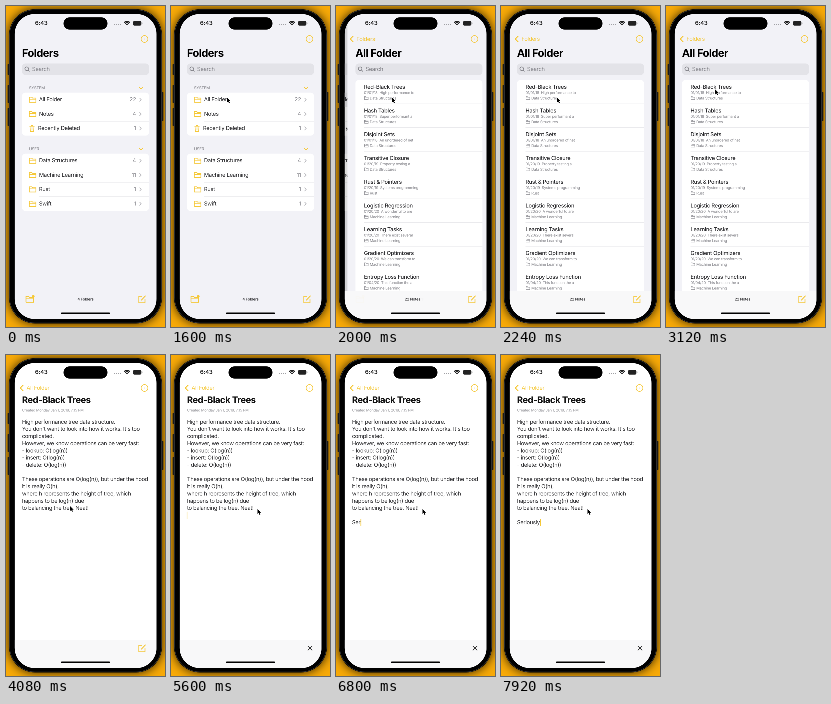
An HTML page with a canvas that plays this animation: 159x321 px, repeating every 8 s.

```html
<!DOCTYPE html>
<html lang="en">
<head>
<meta charset="utf-8">
<title>Notes app</title>
<style>
html, body { margin: 0; width: 100%; height: 100%; overflow: hidden; background: #f8aa08; }
canvas { display: block; width: 159px; height: 321px; }
</style>
</head>
<body>
<canvas id="stage"></canvas>
<script>
const LOOP = 8000, W = 159, H = 321;
const SCALE = 4; // oversampled, so small text stays soft and evenly spaced
const canvas = document.getElementById('stage');
const c = canvas.getContext('2d');
canvas.width = W * SCALE;
canvas.height = H * SCALE;
c.textRendering = 'geometricPrecision';

const YELLOW = '#f5c838', INK = '#2c2c2f', GREY = '#85858b', LINE = '#e4e4e8', PAPER = '#f2f2f7';
const SCREEN = { x: 8.7, y: 8, w: 141.8, h: 305 };

const FOLDER_GROUPS = [
  ['SYSTEM', 82, [['All Folder', 22], ['Notes', 4], ['Recently Deleted', 1]]],
  ['USER', 143, [['Data Structures', 4], ['Machine Learning', 11], ['Rust', 1], ['Swift', 1]]]
];
const DS = 'Data Structures', ML = 'Machine Learning';
const NOTES = [
  ['Red-Black Trees', '01/01/18  High performance to', DS],
  ['Hash Tables', '01/01/18  Super performant a', DS],
  ['Disjoint Sets', '01/01/18  An unordered of net', DS],
  ['Transitive Closure', '01/20/19  Property testing a', DS],
  ['Rust & Pointers', '01/20/19  Systems programming', 'Rust'],
  ['Logistic Regression', '01/20/20  A wonderful to are', ML],
  ['Learning Tasks', '01/20/20  There exist several', ML],
  ['Gradient Optimizers', '01/20/20  We can transform to', ML],
  ['Entropy Loss Function', '01/04/20  This function the a', ML]
];
const BODY = `High performance tree data structure.
You don't want to look into how it works. It's too
complicated.
However, we know operations can be very fast:
- lookup: O(log(n))
- insert: O(log(n))
- delete: O(log(n))

These operations are O(log(n)), but under the hood
it is really O(h),
where h represents the height of tree, which
happens to be log(n) due
to balancing the tree. Neat!`.split('\n');
const TYPED = 'Seriously';

// Cursor keys: time, x, y
const CURSOR = [[500, 164, 190], [1400, 56, 91.5], [2400, 56, 91.5], [3100, 49, 83.2],
  [3740, 49, 83.2], [4060, 64, 151], [4300, 64, 151], [4800, 86.5, 154]];
const OPEN_LIST = 1660, OPEN_NOTE = 3588, EDIT = 5000, ENTER = 6200, TYPE = 6500, KEY = 150;

const clamp = v => Math.min(1, Math.max(0, v));
const mix = (a, b, p) => a + (b - a) * p;
const smooth = p => p * p * (3 - 2 * p);
const push = (t, start) => 1 - (1 - clamp((t - start) / 480)) ** 3;

function text(s, x, y, size = 5.5, color = INK, weight = 400, align = 'left') {
  c.font = `${weight} ${size}px Inter, sans-serif`;
  c.letterSpacing = `${-0.025 * size}px`;
  c.textBaseline = 'middle';
  c.textAlign = align;
  c.fillStyle = color;
  c.fillText(s, x, y);
}
function box(x, y, w, h, r, color) {
  c.beginPath();
  c.roundRect(x, y, w, h, r);
  c.fillStyle = color;
  c.fill();
}
function line(color, width, ...pts) {
  c.beginPath();
  pts.forEach(([x, y]) => c.lineTo(x, y));
  c.strokeStyle = color;
  c.lineWidth = width;
  c.stroke();
}
function arc(x, y, r, color, width, from = 0, to = 7) {
  c.beginPath();
  c.arc(x, y, r, from, to);
  c.strokeStyle = color;
  c.lineWidth = width;
  c.stroke();
}
function layer(alpha, dx, draw) {
  c.save();
  c.globalAlpha *= alpha;
  c.translate(dx, 0);
  draw();
  c.restore();
}

function folder(x, y, w, h, color, width) {
  line(color, width, [x, y + h], [x, y], [x + w * .35, y], [x + w * .5, y + h * .18],
    [x + w, y + h * .18], [x + w, y + h], [x, y + h]);
  line(color, width, [x, y + h * .4], [x + w, y + h * .4]);
}
function trash(x, y) {
  line(YELLOW, .7, [x - 2.5, y - 2.2], [x + 2.5, y - 2.2]);
  line(YELLOW, .7, [x - 1, y - 3], [x + 1, y - 3]);
  line(YELLOW, .7, [x - 2, y - 2], [x - 1.6, y + 3], [x + 1.6, y + 3], [x + 2, y - 2]);
  line(YELLOW, .7, [x, y - 1], [x, y + 2]);
}
function compose(x, y) {
  line(YELLOW, .8, [x, y - 3], [x - 3.2, y - 3], [x - 3.2, y + 3.5], [x + 3, y + 3.5], [x + 3, y]);
  line(YELLOW, .9, [x - .8, y + 1], [x + 3.6, y - 3.6]);
}
function more() {
  arc(138.5, 33, 3.4, YELLOW, .7);
  for (const d of [-1.6, 0, 1.6]) box(138.1 + d, 32.6, .8, .8, .4, YELLOW);
}
function search() {
  box(16, 57.5, 127, 11.5, 3.5, '#e3e3e8');
  arc(20.7, 62.7, 1.8, GREY, .7);
  line(GREY, .7, [22, 64], [23.5, 65.5]);
  text('Search', 26, 63.4, 5.6, GREY);
}

function foldersPage(t) {
  box(8, 8, 143, 306, 0, PAPER);
  search();
  for (const [name, y, rows] of FOLDER_GROUPS) {
    text(name, 23, y, 4, GREY);
    line(YELLOW, .8, [133, y - 1], [135, y + 1], [137, y - 1]);
    const top = y + 4.6;
    box(16, top, 127, rows.length * 14.35, 3.5, '#fff');
    rows.forEach(([label, count], i) => {
      const ry = top + 7.1 + i * 14.35;
      if (label === 'All Folder' && t > OPEN_LIST)
        box(16, top, 127, 14.35, [3.5, 3.5, 0, 0], '#e6e6ea');
      const bin = label === 'Recently Deleted';
      if (bin) trash(26, ry);
      else folder(23.3, ry - 2.6, 6.6, 5.2, YELLOW, .75);
      text(label, bin ? 32 : 33, ry);
      text(count, 130, ry, 5.5, GREY, 400, 'right');
      line('#b9b9be', .7, [133.5, ry - 1.8], [135.2, ry], [133.5, ry + 1.8]);
      if (i) line(LINE, .4, [33, ry - 7.1], [143, ry - 7.1]);
    });
  }
}
function listPage() {
  box(8, 8, 143, 306, 0, PAPER);
  search();
  box(16, 74, 127, 240, [3.5, 3.5, 0, 0], '#fff');
  NOTES.forEach(([title, meta, group], i) => {
    const y = 81 + i * 23.75;
    text(title, 24.5, y, 5.5, INK, 500);
    text(meta, 24.5, y + 5.9, 3.75, GREY);
    folder(25, y + 9.6, 3.8, 3, GREY, .4);
    text(group, 30.3, y + 11.3, 3.8, GREY);
    line(LINE, .4, [24.5, y + 16.8], [143, y + 16.8]);
  });
}
function notePage(t) {
  box(8, 8, 143, 306, 0, '#fff');
  text('Red-Black Trees', 16, 45.2, 9, '#111', 700);
  text('Created Monday Jan 1, 2018, 7:15 PM', 16, 55.5, 3.7, '#9a9a9f');
  const row = i => 67 + i * 7.18;
  BODY.forEach((s, i) => text(s, 16, row(i)));
  const typed = TYPED.slice(0, Math.max(0, Math.floor((t - TYPE) / KEY) + 1));
  text(typed, 16, row(14));
  if (t > EDIT) {
    const x = 15.7 + (typed ? c.measureText(typed).width + .4 : 0);
    const phase = (t - EDIT) % 1000;
    const alpha = t > ENTER ? 1 : 1 - clamp((phase - 500) / 160) + clamp((phase - 840) / 160);
    layer(alpha, 0, () => box(x, row(t > ENTER ? 14 : 13) - 3.7, .8, 7.4, .3, YELLOW));
  }
}

const PAGES = [
  { title: 'Folders', draw: foldersPage },
  { title: 'All Folder', draw: listPage },
  { draw: notePage }
];

// Page `to` slides over page `from`, whose large title shrinks into the back label.
function navigate(from, to, back, p, t) {
  if (p < 1) {
    layer(1, -42 * p, () => from.draw(t));
    box(8, 8, 143, 306, 0, `rgba(0,0,0,${.14 * p})`);
  }
  if (p > 0) layer(1, 141 * (1 - p), () => {
    to.draw(t);
    if (to.title) text(to.title, 16, 47.5, 10.6, '#000', 700);
  });
  if (back) layer(1 - p, -42 * p, () => text(back.title, 20.5, 33, 5.5, YELLOW));
  const x = mix(16, 20.5, p), y = mix(47.5, 33, p), size = mix(10.6, 5.5, p);
  layer(1 - p, 0, () => text(from.title, x, y, size, '#000', 700));
  layer(p, 0, () => text(from.title, x, y, size, YELLOW));
  layer(back ? 1 : p, 0, () => line(YELLOW, 1, [17.2, 30], [14.3, 33], [17.2, 36]));
  layer(Math.abs(1 - 2 * p), 0, more);
}

function toolbar(t, p1, p2) {
  layer(p1, 0, () => {
    box(8, 285, 143, 29, 0, '#f8f8f9');
    line('#dcdce0', .5, [8, 285], [151, 285]);
  });
  layer(1 - p1, 0, () => {
    folder(20, 290.5, 7.5, 5.8, YELLOW, .8);
    box(26, 289, 2.6, 2.6, 1.3, YELLOW);
    text('4 Folders', 79.5, 293.3, 3.8, INK, 500, 'center');
  });
  layer(p1 * clamp(1 - 2 * p2), 0, () => text('22 Notes', 76.5, 293.3, 3.8, INK, 500, 'center'));
  if (t < EDIT) compose(136, 293.3);
  else {
    line('#333', .8, [136.7, 290.8], [141.3, 295.4]);
    line('#333', .8, [141.3, 290.8], [136.7, 295.4]);
  }
}

function statusBar() {
  text('6:43', 29, 17.3, 5.8, '#222', 600);
  box(57.5, 11.3, 44, 12.3, 6.15, '#000');
  for (let i = 0; i < 4; i++) box(108 + i * 2, 17.8, 1.2, 1.2, .6, '#a0a0a4');
  for (const r of [1.3, 2.7, 4]) arc(121, 19.4, r, '#222', 1, -Math.PI * .75, -Math.PI * .25);
  box(127, 15, 8.4, 4.6, 1.4, '#222');
  box(135.8, 16.5, .6, 1.6, .3, '#888');
}

function cursor(t) {
  let i = CURSOR.findIndex(k => k[0] > t);
  if (i === 0) return;
  if (i < 0) i = CURSOR.length - 1;
  const [t0, x0, y0] = CURSOR[i - 1], [t1, x1, y1] = CURSOR[i];
  const p = smooth(clamp((t - t0) / (t1 - t0)));
  c.save();
  c.translate(mix(x0, x1, p), mix(y0, y1, p));
  c.beginPath();
  for (const [x, y] of [[0, 0], [0, 5], [1.2, 4], [2, 5.8], [2.9, 5.4], [2.1, 3.7], [3.6, 3.6]]) c.lineTo(x, y);
  c.closePath();
  c.strokeStyle = '#fff';
  c.lineWidth = .9;
  c.stroke();
  c.fillStyle = '#000';
  c.fill();
  c.restore();
}

function phone() {
  box(0, 0, W, H, 0, '#f8aa08');
  c.save();
  c.shadowColor = 'rgba(0,0,0,.85)';
  c.shadowBlur = 10 * SCALE;
  box(3, 3.2, 153, 314.3, 26, '#000');
  c.restore();
  for (const [x, y, h] of [[1.6, 58, 11], [1.6, 79, 18], [1.6, 102, 18], [155.6, 86, 29]])
    box(x, y, 1.8, h, .6, '#181818');
  c.beginPath();
  c.roundRect(3.6, 3.8, 151.8, 313.1, 25.4);
  c.strokeStyle = '#39393b';
  c.lineWidth = .5;
  c.stroke();
}

function draw(t) {
  const p1 = push(t, OPEN_LIST), p2 = push(t, OPEN_NOTE);
  c.setTransform(SCALE, 0, 0, SCALE, 0, 0);
  phone();
  c.save();
  c.beginPath();
  c.roundRect(SCREEN.x, SCREEN.y, SCREEN.w, SCREEN.h, 20);
  c.clip();
  if (p2 > 0) navigate(PAGES[1], PAGES[2], PAGES[0], p2, t);
  else navigate(PAGES[0], PAGES[1], null, p1, t);
  toolbar(t, p1, p2);
  statusBar();
  box(55, 306.5, 49, 1.7, .85, '#000');
  c.restore();
  cursor(t);
}

function tick() {
  draw(performance.now() % LOOP);
  requestAnimationFrame(tick);
}
tick();
</script>
</body>
</html>
```
